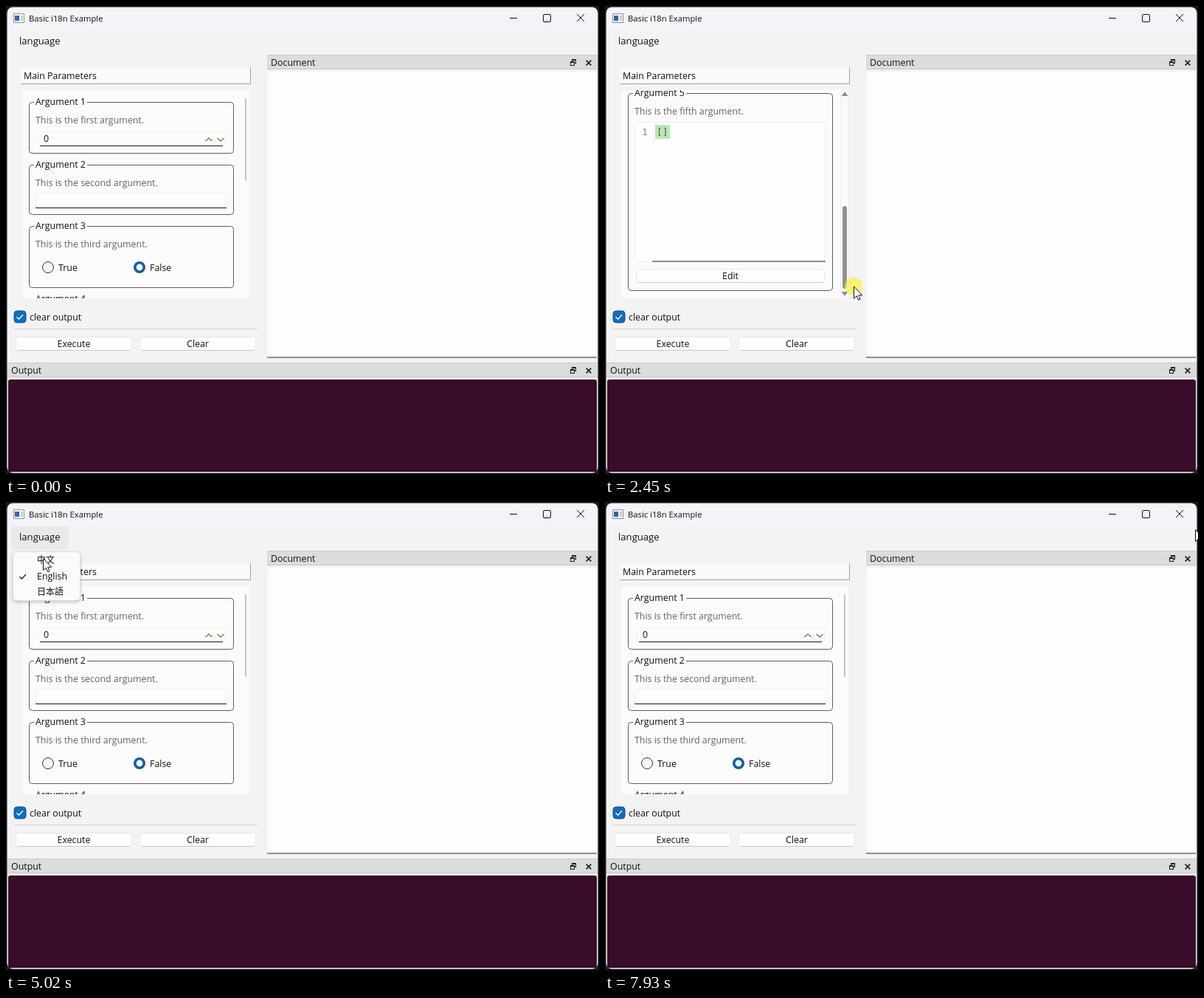
These frames come from a looping animation (804x634 px, 8 s). An HTML page:

```html
<!DOCTYPE html>
<html lang="en">
<head>
<meta charset="utf-8">
<title>Language switch demo</title>
<style>
  html, body { margin: 0; width: 100%; height: 100%; overflow: hidden; background: #1c1b20; }
  svg { display: block; width: 100vw; height: 100vh; }
  text { font: 12.4px "Open Sans", "Noto Sans", sans-serif; fill: #111; white-space: pre; }
  .title { font-size: 11.25px; }
  .menu { font-size: 13.1px; }
  .hint { fill: #636363; }
  .mid { text-anchor: middle; }
  .cjk { font: 12px "Noto Sans CJK SC", "Noto Sans CJK", sans-serif; }
  .code { font: 13px "DejaVu Sans Mono", monospace; }
  .line { fill: none; stroke: #222; }
  .arrow { fill: none; stroke: #80602c; stroke-width: 1.1; }
  .caption, .caption text { fill: #111; }
  .caption .line { stroke: #111; }
  .inactive .caption text { fill: #8c8c8c; }
  .inactive .caption .line { stroke: #8c8c8c; }
  .inactive .on, .active .off { display: none; }
  #titleBar { fill: #f3f3f8; }
  .inactive #titleBar { fill: #f3f3f3; }
</style>
</head>
<body>
<script>
const text = (x, middle, str, cls = '') => `<text x="${x}" y="${middle + 4.3}" class="${cls}">${str}</text>`;
const rect = (x, y, w, h, fill, extra = '') =>
  `<rect x="${x}" y="${y}" width="${w}" height="${h}" fill="${fill}" ${extra}/>`;
const path = (d, extra = 'class="line"') => `<path d="${d}" ${extra}/>`;
const stroke = (color, width = 1) => `fill="none" stroke="${color}" stroke-width="${width}"`;
const cross = (x, y, r, extra) => path(`M${x - r} ${y - r}l${2 * r} ${2 * r}m0 ${-2 * r}l${-2 * r} ${2 * r}`, extra);

const windowIcon = (x, y) =>
  rect(x + .5, y + .5, 14, 12, '#f4f6f8', 'stroke="#8d959c"') +
  rect(x + 2, y + 3, 6, 7, '#2f64a8') + rect(x + 10, y + 3, 3, 7, '#c9ced3');

const button = (x, y, w, label) =>
  rect(x + .5, y + .5, w - 1, 18, '#fdfdfd', 'rx="3" stroke="#e6e6e6"') +
  path(`M${x + 3} ${y + 18.5}h${w - 6}`, stroke('#c6c6c6')) +
  text(x + w / 2, y + 9.5, label, 'mid');

const dockTitle = (x, y, h, label) =>
  rect(x, y, 802 - x, h, '#dcdcdc') +
  path(`M${x} ${y + .5}H802M${x} ${y + h - .5}H802`, stroke('#cacaca')) +
  text(x + 5, y + 10.5, label) +
  path(`M767.5 ${y + 9}v-2.5h5v5h-2M765.5 ${y + 9.5}h5v5h-5zm0 1h5M767.5 ${y + 7.5}h5`, stroke('#222', 1.1)) +
  cross(790, y + 11, 3.3, stroke('#222', 1.7));

const group = (y, h, number, ordinal, body) =>
  rect(31.5, y + .5, 277, h, 'none', 'rx="4" stroke="#5c5c5c"') +
  rect(38, y - 1, 72, 4, '#fbfbfb') +
  text(40, y, `Argument ${number}`) +
  text(40, y + 25, `This is the ${ordinal} argument.`, 'hint') + body;

const spinBox = (y, value) =>
  rect(43.5, y + .5, 254, 19, '#fdfdfd', 'rx="3" stroke="#efefef"') +
  path(`M46 ${y + 19.5}H294`, stroke('#151515', 1.2)) +
  text(51, y + 10, value) +
  path(`M270.5 ${y + 13}l4.5-4 4.5 4M286.5 ${y + 9}l4.5 4 4.5-4`, 'class="arrow"');

const ring = (x, y, r, extra) => `<circle cx="${x}" cy="${y}" r="${r}" ${extra}/>`;
const radios =
  ring(57, 354, 7.5, 'fill="#f6f6f6" stroke="#333"') + text(71, 354.5, 'True') +
  `<g class="on">${ring(181, 354, 6.2, 'fill="#fff" stroke="#125ea9" stroke-width="3.6"')}</g>` +
  `<g class="off">${ring(181, 354, 7.5, stroke('#555')) + ring(181, 354, 4.6, stroke('#777'))}</g>` +
  text(195, 354.5, 'False');

const editor =
  rect(40.5, 521.5, 258, 189, '#fefefe', 'rx="3" stroke="#efefef"') +
  path('M64 710H299', stroke('#6e6e6e', 1.6)) +
  rect(68, 525, 20, 19, '#b4e9b6') +
  text(50, 534.5, '<tspan fill="#8c8c8c">1</tspan>', 'code') +
  text(70, 534.5, '<tspan fill="#8a4a24">[]</tspan>', 'code') +
  button(42, 720, 256, 'Edit');

const tick = (x, y, color) => path(`M${x - 4} ${y}l3 3 5.5-6`, stroke(color, 1.3));

const mainWindow =
  rect(1.5, 1.5, 801, 631, '#f3f3f3', 'rx="8"') +
  path('M2 33V10a8 8 0 0 1 8-8H794a8 8 0 0 1 8 8V33z', 'id="titleBar"') +
  windowIcon(10, 10) +
  rect(7, 33, 78, 31, '#e9e9e9', 'rx="4" id="menuHover"') +
  `<g class="caption">
    ${text(31, 16.7, 'Basic i18n Example', 'title')}
    ${text(18, 47.5, 'language', 'menu')}
    ${path('M683 16.5h10M728.5 13a1.5 1.5 0 0 1 1.5-1.5h7a1.5 1.5 0 0 1 1.5 1.5v7a1.5 1.5 0 0 1-1.5 1.5h-7a1.5 1.5 0 0 1-1.5-1.5z')}
    ${cross(779, 16, 5, 'class="line"')}
  </g>` +
  rect(20, 83, 311, 22, '#fafafa') + path('M20 105.5H331.5V83', stroke('#a0a0a0')) +
  text(24, 95, 'Main Parameters') +
  rect(22, 114, 308, 282, '#fbfbfb', 'rx="4"') +
  `<g clip-path="url(#view)"><g id="content">
    ${group(130, 69, 1, 'first', spinBox(170, '0'))}
    ${group(215, 67, 2, 'second',
      rect(40.5, 253.5, 259, 20, '#fdfdfd', 'rx="2" stroke="#efefef"') + path('M40 273.5H299', stroke('#151515', 1.2)))}
    ${group(298, 83, 3, 'third', radios)}
    ${group(397, 69, 4, 'fourth', spinBox(437, '0.00'))}
    ${group(482, 267, 5, 'fifth', editor)}
  </g></g>
  <g id="track">
    ${rect(319.5, 114, 11, 282, '#fafafa', 'rx="5" stroke="#ededed"')}
    ${path('M320.5 122h9l-4.5-6zM320.5 387h9l-4.5 6z', 'fill="#8d8d8d"')}
  </g>
  <rect id="thumb" height="112"/>` +
  `<g class="on">${rect(11, 413, 16, 16, '#0f6fc2', 'rx="4" stroke="#0b4f8c"') + tick(18.5, 421.3, '#fff')}</g>` +
  `<g class="off">${rect(11.5, 413.5, 15, 15, '#f6f6f6', 'rx="4" stroke="#555"') + tick(18.5, 421.3, '#444')}</g>` +
  text(32, 422, 'clear output') +
  path('M11 437.5H341', stroke('#d2d2d2')) +
  button(13, 448, 158, 'Execute') + button(181, 448, 158, 'Clear') +
  dockTitle(354, 66, 20, 'Document') +
  rect(355, 89, 446, 387, '#fdfdfd', 'rx="3"') + path('M354 476H801', stroke('#6e6e6e', 1.5)) +
  dockTitle(2, 483, 20, 'Output') +
  rect(3, 506, 798, 125, '#380c2a', 'rx="3"') + path('M4 630.5H800', stroke('#1d0516'));

const menu =
  rect(9.5, 67.5, 91, 66, '#fbfbfb', 'rx="5" stroke="#dcdcdc" filter="url(#menuShadow)"') +
  text(42, 79, '中文', 'cjk') + text(42, 101, 'English') + text(42, 122, '日本語', 'cjk') +
  tick(22.5, 101, '#222');

const dialog =
  rect(284, 247, 217, 122, '#f3f3f3', 'rx="8" stroke="#9c9c9c" filter="url(#dialogShadow)"') +
  windowIcon(292, 255) + text(313, 261.7, 'Information', 'title') +
  cross(486, 261, 5, 'class="line"') +
  ring(311, 304, 16, 'fill="url(#blue)"') +
  rect(310, 300, 2, 12, '#fff') + ring(311, 296.5, 1.4, 'fill="#fff"') +
  text(346, 296, '语言已切换，请重启程序！', 'cjk') +
  rect(417.5, 337.5, 70, 18, '#fdfdfd', 'rx="4" id="okButton"') + text(452, 346.5, 'OK', 'mid');

const shadow = (id, dy, blur, alpha) => `<filter id="${id}" x="-50%" y="-50%" width="200%" height="220%">
  <feDropShadow dx="0" dy="${dy}" stdDeviation="${blur}" flood-opacity="${alpha}"/></filter>`;

document.body.innerHTML = `<svg viewBox="0 0 804 634" preserveAspectRatio="none">
  <defs>
    <clipPath id="view">${rect(22, 114, 308, 282, '#000')}</clipPath>
    <linearGradient id="blue" x2="0" y2="1"><stop stop-color="#1c9be2"/><stop offset="1" stop-color="#0b74cc"/></linearGradient>
    ${shadow('menuShadow', 2, 2, .22)}${shadow('dialogShadow', 15, 14, .36)}
  </defs>
  <g id="main">${mainWindow}</g>
  <g id="menu">${menu}</g>
  <g id="dialog">${dialog}</g>
  <g id="pointer">
    ${ring(0, 0, 12, 'id="press" fill="#fff02a" fill-opacity=".65"')}
    ${path('M.5 .5V16.5L4.2 13.1 6.6 18.7 9 17.7 6.7 12.2H11.8Z', 'fill="#fff" stroke="#111"')}
  </g>
</svg>`;

const LOOP = 8000;
// Pointer stops: time in ms, x, y
const stops = [
  [70, 472, 640], [400, 372, 525], [810, 327, 225], [880, 327, 225], [950, 327, 221], [1150, 327, 221],
  [1360, 326, 284], [1920, 331, 397], [2380, 331, 397], [2450, 337, 380], [2700, 343, 290], [2920, 329, 215],
  [3110, 329, 215], [3860, 34, 51], [4450, 34, 51], [4660, 55, 85], [4810, 55, 85], [5020, 50, 76],
  [5160, 50, 76], [5500, 191, 229], [5920, 470, 318], [6300, 470, 318], [6460, 470, 342], [7120, 470, 342],
  [7390, 544, 543], [7520, 544, 543], [7930, 800, 37]
];
const presses = [[1150, 3110], [3930, 4190], [5160, 5230], [6600, 6730]];

const clamp = (v, lo = 0, hi = 1) => Math.min(hi, Math.max(lo, v));
const lerp = (a, b, k) => a + (b - a) * k;
const ramp = (t, from, to) => clamp((t - from) / (to - from));
const within = (t, [from, to]) => t >= from && t < to;
const el = id => document.getElementById(id);
const set = (id, attrs) => Object.entries(attrs).forEach(([name, value]) => el(id).setAttribute(name, value));

function pointerAt(t) {
  const next = stops.findIndex(stop => stop[0] > t);
  if (next < 1) return (next ? stops[stops.length - 1] : stops[0]).slice(1);
  const [a, b] = [stops[next - 1], stops[next]];
  const k = ramp(t, a[0], b[0]);
  return [lerp(a[1], b[1], k), lerp(a[2], b[2], k)];
}

function draw(t) {
  const [x, y] = pointerAt(t);
  set('pointer', { transform: `translate(${x} ${y})` });
  set('press', { opacity: presses.some(span => within(t, span)) ? 1 : 0 });

  const drag = within(t, [1150, 3110]) ? clamp((y - 221) / 146) : 0;
  const hover = ramp(t, 740, 880) * (1 - ramp(t, 3180, 3380));
  const width = lerp(2, 6, hover);
  set('content', { transform: `translate(0 ${-Math.round(364 * drag)})` });
  set('track', { opacity: hover });
  set('thumb', {
    x: 325 - width / 2, y: 125 + 146 * drag, width, rx: width / 2,
    fill: hover > .5 ? '#929292' : '#c2c2c2'
  });

  set('menuHover', { opacity: within(t, [3930, 5160]) ? 1 : 0 });
  set('menu', { opacity: ramp(t, 4010, 4190) * (1 - ramp(t, 5160, 5290)) });

  const shown = ramp(t, 5230, 5430) * (1 - ramp(t, 6730, 6900));
  const scale = lerp(.9, 1, 1 - (1 - shown) ** 2);
  set('dialog', {
    opacity: shown,
    transform: `translate(392.5 308) scale(${scale}) translate(-392.5 -308)`
  });
  set('okButton', { stroke: t < 5990 ? '#10708a' : '#555' });
  set('main', { class: within(t, [5230, 6800]) ? 'inactive' : 'active' });
}

const start = performance.now();
function frame() {
  draw((performance.now() - start) % LOOP);
  requestAnimationFrame(frame);
}
frame();
</script>
</body>
</html>
```
